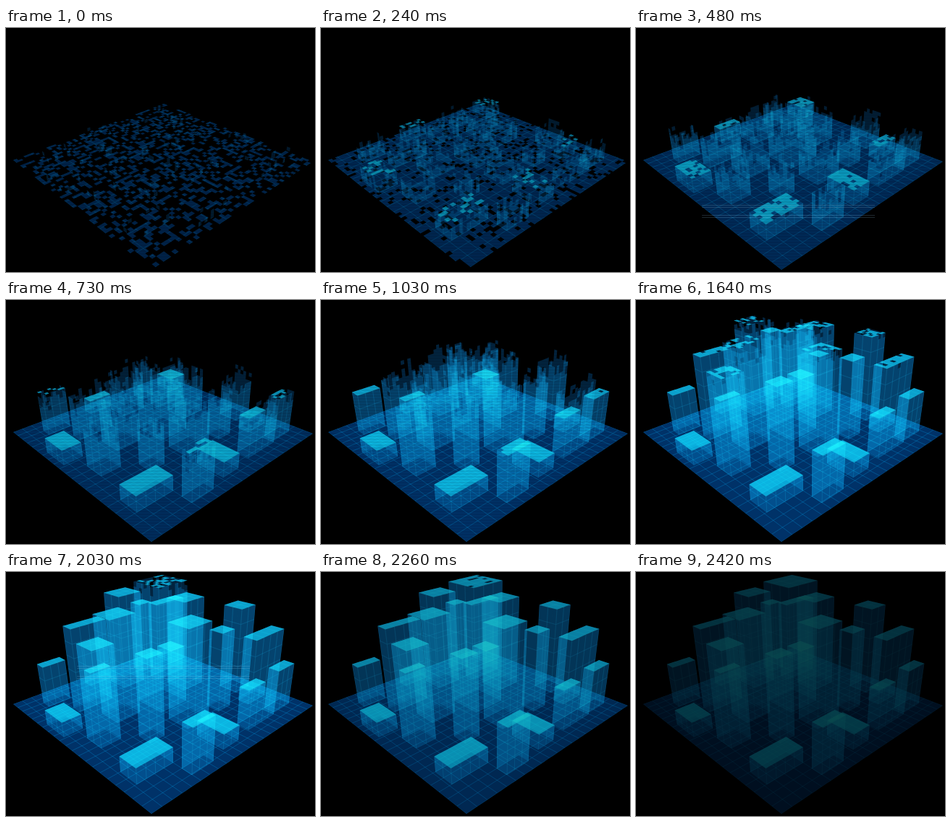
Recreate the animation shown at these times as an HTML page with a canvas. Size 427 by 338 pixels, loop 2.49 s.

```html
<!DOCTYPE html>
<html>
<head>
<meta charset="utf-8">
<title>Hologram city</title>
<style>
html, body { margin: 0; width: 100%; height: 100%; overflow: hidden; background: #000; }
canvas { display: block; width: 427px; height: 338px; }
</style>
</head>
<body>
<canvas id="stage" width="427" height="338"></canvas>
<script>
const ctx = document.getElementById('stage').getContext('2d');
const LOOP = 2490, STEPS = 32;
const CELL = .018, GRID = .047, STOREY = .0128;
const SPREAD = .026;

const WALL = { fill: 'rgb(2,36,63)', line: 'rgb(2,30,44)' };
const ROOF = { fill: 'rgb(9,146,188)', line: 'rgb(2,30,36)' };
const GROUND = { fill: 'rgb(0,50,104)', line: 'rgb(0,38,62)' };

// Each model: size on the unit ground, height, and the centres where it stands
const MODELS = [
  { w: .094, d: .18, h: STOREY, at: [[.811, .852]] },
  { w: .14, d: .095, h: STOREY, at: [[.865, .513], [.348, .925]] },
  { w: .055, d: .128, h: STOREY, at: [[.082, .555], [.759, .138]] },
  { w: .115, d: .105, h: STOREY, at: [[.138, .073]] },
  { w: .052, d: .118, h: .0364, at: [[.931, .704], [.118, .828], [.886, .119]] },
  { w: .07, d: .08, h: .0667, at: [[.668, .7], [.128, .278], [.697, .308]] },
  { w: .06, d: .183, h: .0717, at: [[.261, .714], [.27, .231], [.889, .284]] },
  { w: .1, d: .1, h: .0752, at: [[.543, .855], [.626, .101]] },
  { w: .116, d: .133, h: .08, at: [[.678, .488], [.421, .248]] },
  { w: .115, d: .131, h: .084, at: [[.43, .676], [.192, .445]] },
  { w: .155, d: .163, h: .102, at: [[.48, .461]] }
];

let front = 0;

function project(u, v, z) {
  const w = 1 - .2563 * u - .2207 * v - z;
  return [(97.3 * u - 210.2 * v + 218 - 237 * z) / w,
          (32.6 * u + 37.6 * v + 105 - 1270 * z) / w];
}

function hash(i, j, seed) {
  const s = Math.sin(i * 127.1 + j * 311.7 + seed * 74.7) * 43758.5453;
  return s - Math.floor(s);
}

const level = z => (front - z) / SPREAD + .5;
const parts = (size, unit) => Math.max(1, Math.round(size / unit));

function quad(at, a0, b0, a1, b1) {
  ctx.moveTo(...at(a0, b0));
  ctx.lineTo(...at(a1, b0));
  ctx.lineTo(...at(a1, b1));
  ctx.lineTo(...at(a0, b1));
  ctx.closePath();
}

// Fills the revealed cells; at(a, b) maps 0..1 on the face to the screen
function cells(at, cols, rows, levelAt, streak, seed, look) {
  ctx.beginPath();
  for (let j = 0; j < rows; j++) {
    const shown = levelAt((j + .5) / rows), b0 = j / rows, b1 = (j + 1) / rows;
    if (shown >= 1) quad(at, 0, b0, 1, b1);
    else if (shown > 0) {
      for (let i = 0; i < cols; i++) {
        const n = hash(i, j, seed) * (1 - streak) + hash(i, 99, seed) * streak;
        if (n < shown) quad(at, i / cols, b0, (i + 1) / cols, b1);
      }
    }
  }
  ctx.fillStyle = look.fill;
  ctx.fill();
}

// Rules the face, only where the cells just filled are
function lines(at, na, nb, look) {
  ctx.save();
  ctx.clip();
  ctx.beginPath();
  for (let i = 0; i <= na; i++) {
    ctx.moveTo(...at(i / na, 0));
    ctx.lineTo(...at(i / na, 1));
  }
  for (let j = 0; j <= nb; j++) {
    ctx.moveTo(...at(0, j / nb));
    ctx.lineTo(...at(1, j / nb));
  }
  ctx.strokeStyle = look.line;
  ctx.stroke();
  ctx.restore();
}

function wall(u0, v0, u1, v1, h, seed, ruled) {
  const at = (a, b) => project(u0 + (u1 - u0) * a, v0 + (v1 - v0) * a, h * b);
  const len = u1 - u0 + v1 - v0;
  cells(at, parts(len, CELL), parts(h, .0036), b => level(h * b), .55, seed, WALL);
  if (ruled) lines(at, parts(len, GRID), parts(h, STOREY), WALL);
}

function slab(u0, v0, u1, v1, z, seed, look) {
  const at = (a, b) => project(u0 + (u1 - u0) * a, v0 + (v1 - v0) * b, z);
  const w = u1 - u0, d = v1 - v0;
  cells(at, parts(w, CELL), parts(d, CELL), () => level(z), 0, seed, look);
  lines(at, parts(w, GRID), parts(d, GRID), look);
}

function building({ w, d, h }, [u, v]) {
  const u0 = u - w / 2, u1 = u + w / 2, v0 = v - d / 2, v1 = v + d / 2;
  const seed = u * 90 + v * 37;
  wall(u0, v0, u1, v0, h, seed, false);
  wall(u0, v0, u0, v1, h, seed + 1, false);
  wall(u0, v1, u1, v1, h, seed + 2, true);
  wall(u1, v0, u1, v1, h, seed + 3, true);
  slab(u0, v0, u1, v1, h, seed + 4, ROOF);
}

function beams(step) {
  const x = 89 + .35 * step, y = Math.round(279 - 5.75 * step);
  ctx.fillStyle = 'rgba(150,200,230,.2)';
  for (const dy of [0, 3, 14, 17]) ctx.fillRect(x, y + dy, 239, 1);
}

function scanlines(alpha) {
  ctx.fillStyle = `rgba(0,0,0,${alpha})`;
  for (let y = 0; y < 338; y += 4) ctx.fillRect(0, y, 427, 2);
}

function draw(step) {
  const t = step * LOOP / STEPS;
  front = -.003 + 5.1e-5 * t;
  ctx.globalCompositeOperation = 'source-over';
  ctx.fillStyle = '#000';
  ctx.fillRect(0, 0, 427, 338);

  ctx.globalCompositeOperation = 'screen';
  slab(0, 0, 1, 1, 0, 0, GROUND);
  for (const model of MODELS) {
    for (const site of model.at) building(model, site);
  }

  ctx.globalCompositeOperation = 'source-over';
  if (t < 1200) scanlines(.07);
  const rise = Math.min(1, .68 + .00028 * t);
  const fall = Math.min(1, 1 - (t - 2190) / 320);
  ctx.fillStyle = `rgba(0,0,0,${1 - rise * fall})`;
  ctx.fillRect(0, 0, 427, 338);
  if (step % 20 === 6) beams(step);
}

let last = -1;
function tick(now) {
  const step = Math.floor(now % LOOP / LOOP * STEPS);
  if (step !== last) draw(last = step);
  requestAnimationFrame(tick);
}
tick(0);
</script>
</body>
</html>
```
